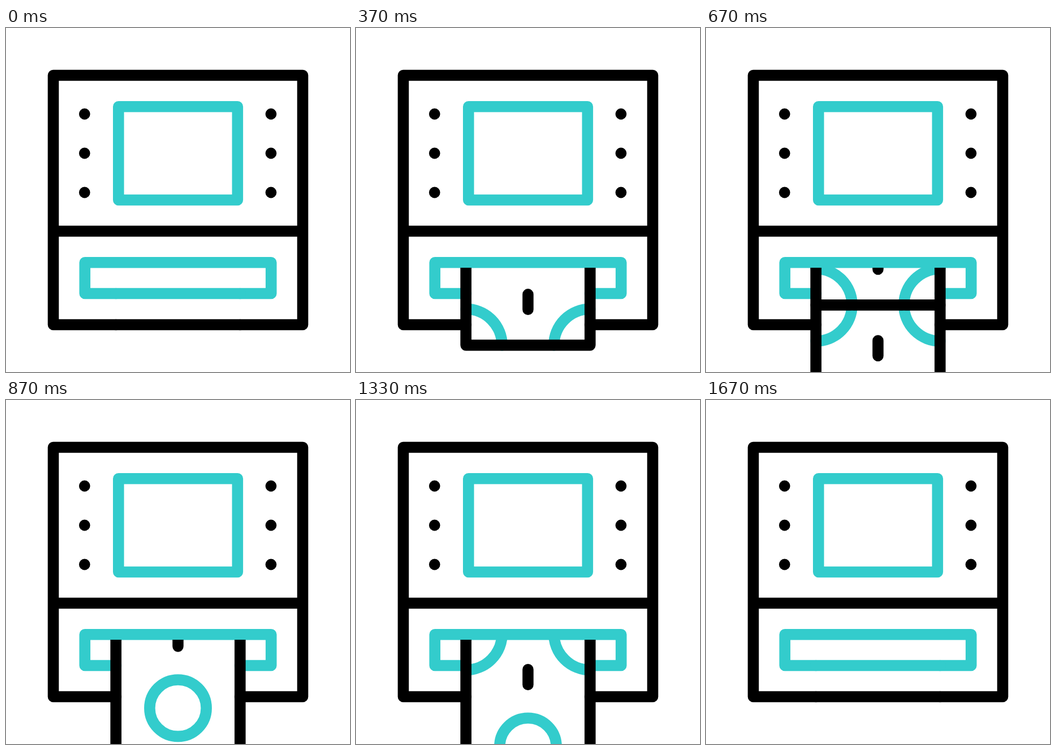
An HTML page for the animation above (2 s loop, 640 px wide and 640 px high).

```html
<!DOCTYPE html>
<html lang="en">
<head>
<meta charset="utf-8">
<title>Cash machine</title>
<style>
  html, body { margin: 0; width: 100%; height: 100%; overflow: hidden; background: #fff; }
  svg { display: block; width: 100%; height: 100%; }
  .line { fill: none; stroke: #000; stroke-width: 20.6; stroke-linecap: round; stroke-linejoin: round; }
  .teal { stroke: #33cccc; }
</style>
</head>
<body>
<svg viewBox="0 0 640 640">
  <defs>
    <clipPath id="outlet"><rect x="180" y="446" width="280" height="194"/></clipPath>
    <!-- A banknote whose bottom edge lies on y = 0 -->
    <g id="note" class="line">
      <g class="teal">
        <path d="M204.5-67.2A67.2 67.2 0 0 1 271.7 0M435.5-67.2A67.2 67.2 0 0 0 368.3 0"/>
        <path d="M204.5-351.8A67.2 67.2 0 0 0 271.7-419M435.5-351.8A67.2 67.2 0 0 1 368.3-419"/>
        <circle cx="320" cy="-209.5" r="52.7"/>
      </g>
      <path d="M320-94.7v28.4M320-352.7v28.4"/>
      <path d="M204.5 0V-419H435.5V0Z"/>
    </g>
    <g id="dots">
      <circle cy="160" r="10.4"/><circle cy="233" r="10.4"/><circle cy="306" r="10.4"/>
    </g>
  </defs>

  <g class="line">
    <path d="M204.5 552H88V88H552V552H435.5M88 378H552"/>
    <path class="teal" d="M209.3 146.2H430.8V320H209.3Z"/>
    <path class="teal" d="M204.5 494H146.7V436.2H493.3V494H435.5"/>
  </g>
  <use href="#dots" x="146.2"/>
  <use href="#dots" x="493"/>

  <g id="closed" class="line">
    <path d="M204.5 552H435.5"/>
    <path class="teal" d="M204.5 494H435.5"/>
  </g>

  <g clip-path="url(#outlet)">
    <g id="strip">
      <use href="#note"/>
      <use href="#note" y="-419"/>
      <use href="#note" y="-838"/>
    </g>
  </g>
</svg>
<script>
  const LOOP = 2000, STEP = 1000 / 30;
  const START = 4, EXIT = 40, END = 50; // steps
  const strip = document.getElementById('strip');
  const closed = document.getElementById('closed');

  const smooth = x => {
    const s = Math.min(1, Math.max(0, x));
    return s * s * (3 - 2 * s);
  };

  // Bottom edge of the first note: eased feed, then a steady exit
  const feed = n => n < EXIT
    ? 435 + 1310 * smooth((n - 1.6) / 43.8)
    : 1692 + 21.6 * (n - EXIT);

  function draw(now) {
    const n = Math.floor((now % LOOP + 4) / STEP);
    const active = n >= START && n < END;
    strip.setAttribute('transform', `translate(0 ${feed(n).toFixed(2)})`);
    strip.setAttribute('visibility', active ? 'visible' : 'hidden');
    closed.setAttribute('visibility', active ? 'hidden' : 'visible');
  }

  let origin;
  function tick(now) {
    origin ??= now;
    draw(now - origin);
    requestAnimationFrame(tick);
  }
  draw(0);
  requestAnimationFrame(tick);
</script>
</body>
</html>
```
